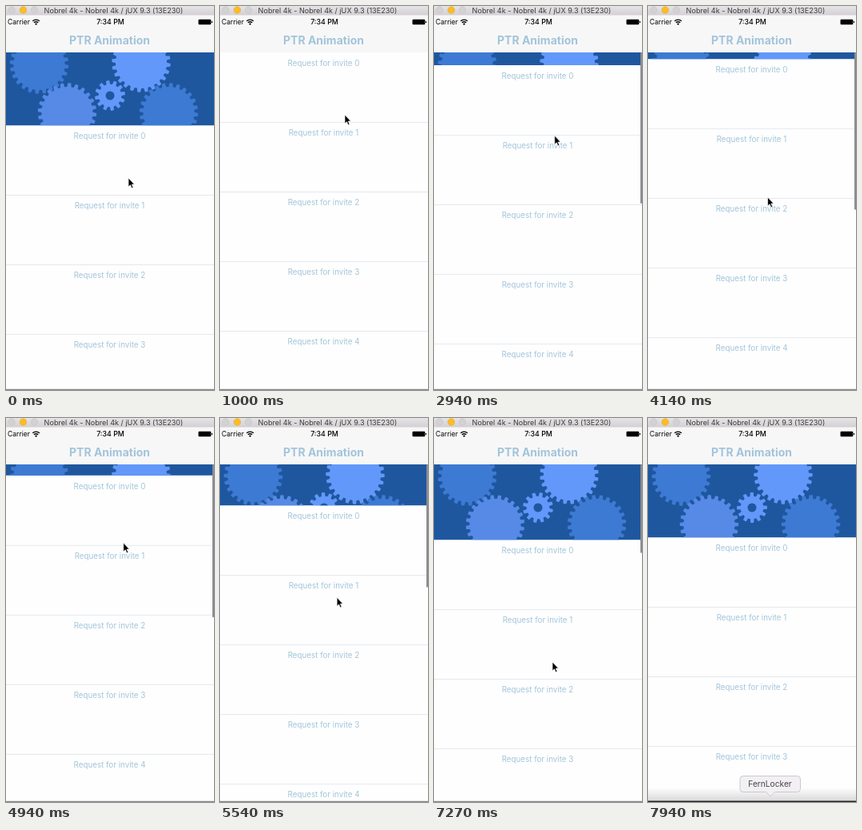
These frames come from a looping animation (260 px wide and 480 px high, 8 s). An HTML page:

```html
<!DOCTYPE html>
<html lang="en">
<head>
<meta charset="utf-8">
<title>PTR Animation</title>
<style>
html, body { margin: 0; width: 100%; height: 100%; overflow: hidden; background: #fff; }
svg { display: block; font-family: Inter, "Liberation Sans", sans-serif; }
#stage { width: 260px; height: 480px; }
text { text-anchor: middle; }
#rows { fill: #a3c5da; font-size: 9.8px; }
</style>
</head>
<body>
<svg id="stage" viewBox="0 0 260 480">
  <defs>
    <linearGradient id="chrome" x2="0" y2="1">
      <stop stop-color="#e6e4e6"/><stop offset="1" stop-color="#d2d0d2"/>
    </linearGradient>
    <linearGradient id="shade" x2="0" y2="1">
      <stop stop-opacity="0"/><stop offset="1" stop-opacity=".14"/>
    </linearGradient>
  </defs>
  <rect width="260" height="480" fill="#fefefe"/>
  <svg id="panel" y="58" width="260" height="91" overflow="hidden">
    <rect width="260" height="100" fill="#1f579f"/>
  </svg>
  <g id="rows"></g>
  <rect id="bar" x="258" y="58" width="2" rx="1" fill="#8c8c91"/>

  <rect y="11" width="260" height="47" fill="#f8f7f8"/>
  <rect width="260" height="11.5" fill="url(#chrome)"/>
  <g stroke-width=".5">
    <circle cx="7" cy="5" r="4.3" fill="#d3d1d3" stroke="#c2c0c2"/>
    <circle cx="21.5" cy="5" r="4.3" fill="#fdbc20" stroke="#e2a329"/>
    <circle cx="35.5" cy="5" r="4.3" fill="#d3d1d3" stroke="#c2c0c2"/>
  </g>
  <text x="134.500" y="8.600" font-size="9.100" fill="#3c3c3c">Nobrel 4k - Nobrel 4k / jUX 9.3 (13E230)</text>

  <text x="16" y="23" font-size="8.500">Carrier</text>
  <g fill="none" stroke="#000" stroke-width="1.300">
    <path d="M33.2 18.9a6.2 6.2 0 0 1 8.8 0M34.9 20.9a3.8 3.8 0 0 1 5.4 0"/>
  </g>
  <path d="M37.6 24l-1.5-1.7a2.1 2.1 0 0 1 3 0z"/>
  <text x="130.500" y="23" font-size="8.800" font-weight="500">7:34 PM</text>
  <rect x="240.500" y="16.700" width="15.800" height="6.600" rx="1.200"/>
  <rect x="256.800" y="18.800" width="1.200" height="2.400" rx=".6"/>
  <text x="129.500" y="47.600" font-size="14" font-weight="650" fill="#a3c5da">PTR Animation</text>

  <rect y="478.800" width="260" height="1.200" fill="#858585"/>
  <g id="tip">
    <rect y="462" width="260" height="16" fill="url(#shade)"/>
    <rect y="478.500" width="260" height="1.500" fill="#222"/>
    <path d="M119 447.500H186.500a4 4 0 0 1 4 4V463.500a4 4 0 0 1-4 4H158.500L153 473L147.500 467.500H119a4 4 0 0 1-4-4V451.500a4 4 0 0 1 4-4z"
      fill="#f2f0f3" stroke="#cac8cc"/>
    <text x="152.500" y="461" font-size="10.200" fill="#444">FernLocker</text>
  </g>
  <path id="cursor" d="M0 0V11L2.500 8.700L4.200 12.700L6 11.900L4.300 8H7.500Z" stroke="#fff" stroke-width=".7"/>
</svg>
<script>
const LOOP = 8000, TOP = 58, ROW = 87, REST = 91.2;
const $ = id => document.getElementById(id);
const clamp = v => Math.max(0, Math.min(1, v));

function add(parent, tag, attrs, label = '') {
  const el = document.createElementNS('http://www.w3.org/2000/svg', tag);
  for (const key in attrs) el.setAttribute(key, attrs[key]);
  el.textContent = label;
  return parent.appendChild(el);
}

function gearPath(teeth, inner, outer) {
  const pitch = 2 * Math.PI / teeth, points = [];
  for (let i = 0; i < teeth; i++) {
    for (const [r, a] of [[inner, -.32], [outer, -.2], [outer, .2], [inner, .32]]) {
      const angle = (i + a) * pitch;
      points.push((r * Math.cos(angle)).toFixed(2) + ' ' + (r * Math.sin(angle)).toFixed(2));
    }
  }
  return 'M' + points.join('L') + 'Z';
}

// Centre inside the panel, colour, turning ratio
const big = gearPath(24, 32, 36.7), small = gearPath(12, 14.3, 19);
const gears = [
  [41.5, 15, '#3d7ad4', 1, big],
  [169, 13, '#6298fa', 1, big],
  [76.5, 75, '#568ae6', 1, big],
  [203.5, 75, '#3d7ad4', 1, big],
  [130, 54, '#6298fa', -2, small]
].map(([x, y, fill, ratio, d]) => ({ x, y, ratio, el: add($('panel'), 'path', { d, fill }) }));
add($('panel'), 'circle', { cx: 130, cy: 54, r: 5.5, fill: '#1f579f' });

for (let i = 0; i < 5; i++) {
  add($('rows'), 'text', { x: 129.5, y: i * ROW + 17 }, 'Request for invite ' + i);
  add($('rows'), 'rect', { y: (i + 1) * ROW, width: 260, height: .8, fill: '#dfe3ea' });
}

// Pointer: time, x, y
const path = [
  [0, 153, 215], [350, 153, 215], [1000, 156, 136], [1150, 156, 136], [1800, 157, 234],
  [1850, 157, 239], [2200, 157, 239], [2560, 151, 133], [2640, 151, 133], [3740, 150, 239],
  [4250, 149.5, 239], [4660, 147, 131], [4720, 147, 131], [5670, 146, 239], [6400, 145.5, 239],
  [6680, 147, 133], [6740, 147, 133], [7200, 148, 305], [7300, 148, 305], [7750, 152, 495], [LOOP, 152, 495]
];

// Drags: start, release, resting height afterwards
const drags = [[1150, 2050, 0], [2640, 3935, 0], [4720, 5940, 0], [6740, 7260, REST]];
const REFRESHED = 350;

function pointer(t) {
  const i = path.findIndex(p => p[0] > t);
  const [a, b] = [path[i - 1], path[i]];
  const k = (t - a[0]) / (b[0] - a[0]);
  return [a[1] + (b[1] - a[1]) * k, a[2] + (b[2] - a[2]) * k];
}

const lastDrag = t => drags.filter(d => d[0] <= t).pop();
const settle = (from, to, ms) => to + (from - to) * Math.exp(-.0095 * ms);

function pullHeight(t) {
  const drag = lastDrag(t);
  if (!drag) return t < REFRESHED ? REST : settle(REST, 0, t - REFRESHED);
  const [start, release, rest] = drag;
  const pulled = .55 * (pointer(Math.min(t, release))[1] - pointer(start)[1]);
  return t < release ? pulled : settle(pulled, rest, t - release);
}

function barAlpha(t) {
  const drag = lastDrag(t);
  return drag ? clamp((drag[1] + 620 - t) / 200) : 0;
}

function draw(t) {
  const h = pullHeight(t), [x, y] = pointer(t);
  const spin = t < REFRESHED ? t : Math.max(0, t - 7260);
  const angle = h * 1.2 + spin * .06;
  $('panel').setAttribute('height', h < .3 ? 0 : h);
  $('rows').setAttribute('transform', `translate(0 ${TOP + h})`);
  for (const g of gears) {
    g.el.setAttribute('transform', `translate(${g.x} ${g.y}) rotate(${angle * g.ratio})`);
  }
  $('bar').setAttribute('height', Math.max(0, 205 - h));
  $('bar').setAttribute('opacity', barAlpha(t));
  $('cursor').setAttribute('transform', `translate(${x} ${y})`);
  $('tip').setAttribute('visibility', t >= 7860 ? 'visible' : 'hidden');
}

const begin = performance.now();
function tick() {
  draw((performance.now() - begin) % LOOP);
  requestAnimationFrame(tick);
}
tick();
</script>
</body>
</html>
```
